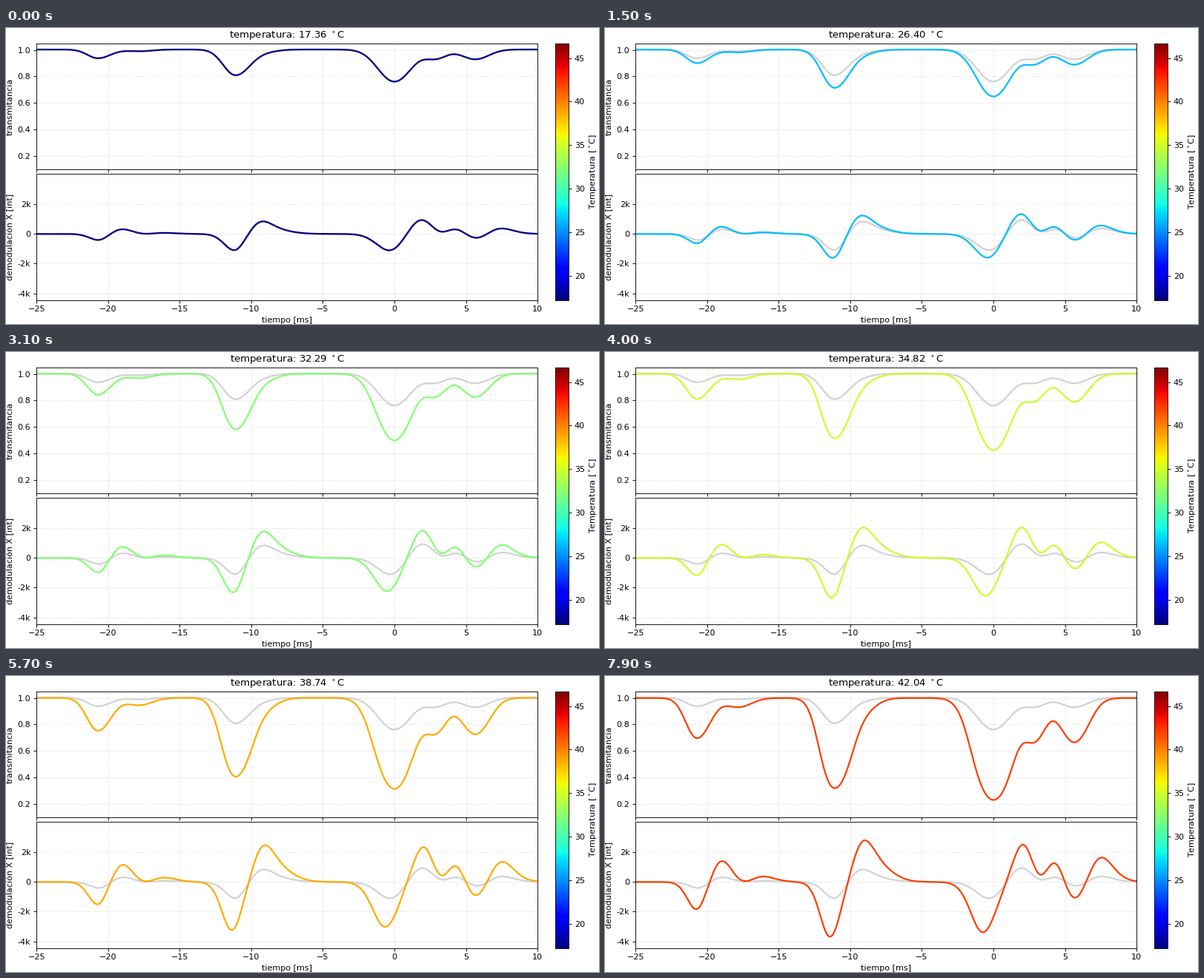
A matplotlib script for the animation above (8 s loop, 800 px wide and 400 px high).

```python
import numpy as np
import matplotlib.pyplot as plt
from matplotlib.animation import FuncAnimation
from matplotlib.cm import ScalarMappable
from matplotlib.colors import Normalize

W, H, DPI = 800, 400, 80
FRAMES, INTERVAL = 80, 100
T_MIN, T_MAX = 17.2, 46.7

plt.rcParams["font.family"] = "DejaVu Sans"

# Heating curve: smooth polynomial through a few readings
HEATING = {0: 17.36, 8: 22.79, 22: 29.28, 40: 34.82, 57: 38.74, 70: 40.91, 79: 42.04}
heating = np.polynomial.Polynomial.fit(list(HEATING), list(HEATING.values()), 6)

DT = 0.05
time = np.arange(-30, 10 + DT, DT)


def line(center, depth, left, right=None):
    """Absorption line: a Gaussian with its own width on each side."""
    width = np.where(time < center, left, right or left)
    return depth * np.exp(-((time - center) / width) ** 2 / 2)


absorption = 0.005 + sum([
    line(-20.7, 0.36, 0.73, 0.85),
    line(-17.8, 0.071, 0.87),
    line(-11.1, 1.13, 0.82, 0.95),
    line(-9.1, 0.085, 0.9),
    line(0, 1.46, 1.08),
    line(2.9, 0.36, 0.73),
    line(5.65, 0.405, 0.92),
])


def transmission(temp):
    """Beer-Lambert law; the vapour gets denser as the cell heats up."""
    density = 0.186 + 0.814 * ((temp - 15) / 27.04) ** 2.3
    return 1.004 * np.exp(-density * absorption)


def demodulation(temp, delay=0.25, tau=0.32, gain=9400):
    """Slope of the transmission after a delayed two-pole low-pass filter."""
    s = np.arange(0, 5, DT)
    lag = np.maximum(s - delay, 0)
    kernel = lag * np.exp(-lag / tau)
    slope = np.gradient(transmission(temp), time)
    return gain * np.convolve(slope, kernel / kernel.sum())[:len(time)]


fig = plt.figure(figsize=(W / DPI, H / DPI), dpi=DPI, facecolor="white")


def panel(left, top, right, bottom, **kw):
    return fig.add_axes([left / W, 1 - bottom / H,
                         (right - left) / W, (bottom - top) / H], **kw)


ax_t = panel(41.1, 20.6, 717.2, 191.2)
ax_d = panel(41.1, 197.1, 717.2, 367.7, sharex=ax_t)
cax = panel(741.1, 20.6, 759.1, 367.7)

ax_t.set(xlim=(-25, 10), ylim=(0.1, 1.05), ylabel="transmitancia",
         yticks=[0.2, 0.4, 0.6, 0.8, 1.0])
ax_t.tick_params(labelbottom=False)
ax_d.set(ylim=(-4450, 4040), xlabel="tiempo [ms]", ylabel="demodulación X [int]")
ax_d.set_yticks([-4000, -2000, 0, 2000], ["-4k", "-2k", "0", "2k"])
for ax in (ax_t, ax_d):
    ax.grid(linestyle=":", color="lightgray")

heat = ScalarMappable(Normalize(T_MIN, T_MAX), "jet")
fig.colorbar(heat, cax=cax, label=r"Temperatura [$^\circ$C]")

# Cold reference behind the live traces
ax_t.plot(time, transmission(T_MIN), color="lightgray", lw=2)
ax_d.plot(time, demodulation(T_MIN, delay=0.32), color="lightgray", lw=2)
trace_t, = ax_t.plot([], [], lw=2)
trace_d, = ax_d.plot([], [], lw=2)
title = ax_t.set_title("")


def draw(n):
    temp = heating(n)
    trace_t.set_data(time, transmission(temp))
    trace_d.set_data(time, demodulation(temp))
    for trace in (trace_t, trace_d):
        trace.set_color(heat.to_rgba(float(temp)))
    title.set_text(rf"temperatura: {temp:.2f} $^\circ$C")
    return trace_t, trace_d, title


anim = FuncAnimation(fig, draw, frames=FRAMES, interval=INTERVAL,
                     repeat=True, repeat_delay=0, blit=False)
plt.show()
```
